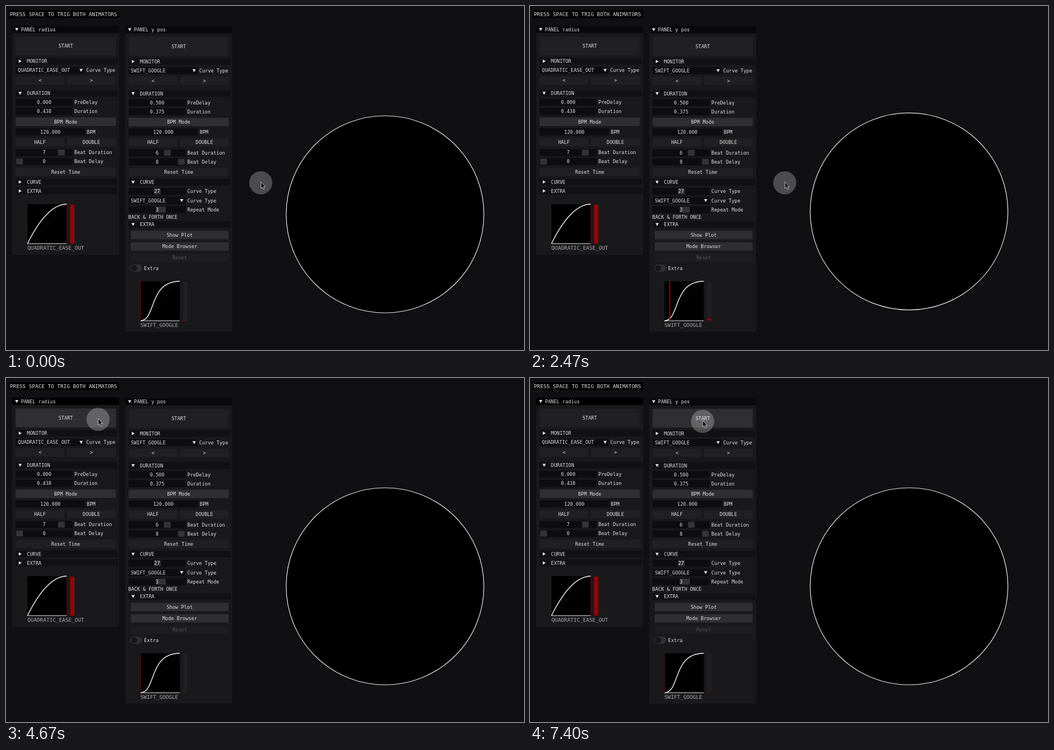
Recreate the animation shown at these times as an HTML page. Size 917 px wide and 611 px high, loop 8 s.

```html
<!DOCTYPE html>
<html lang="en">
<head>
<meta charset="utf-8">
<title>Animator panels</title>
<style>
  html, body { margin: 0; width: 100%; height: 100%; overflow: hidden; background: #100f12; }
  svg { display: block; width: 917px; height: 611px; }
  text { font: 8.53px "DejaVu Sans Mono", monospace; fill: #dedede; white-space: pre; }
  text.wide { font-size: 9.27px; }
</style>
</head>
<body>
<svg id="stage" viewBox="0 0 917 611"></svg>
<script>
const LOOP = 8000;
const stage = document.getElementById('stage');
const hotspots = [];
const BUTTON = '#202022', HOVER = '#2f2f31', FIELD = '#0d0d0f', HEADER = '#111113';

function add(tag, attrs, content) {
  const node = document.createElementNS('http://www.w3.org/2000/svg', tag);
  set(node, attrs);
  if (content) node.textContent = content;
  return stage.appendChild(node);
}

function set(node, attrs) {
  for (const key in attrs) node.setAttribute(key, attrs[key]);
}

function box(x, y, width, height, fill, hover, rx = 1) {
  const node = add('rect', { x, y, width, height, fill, rx });
  if (hover) hotspots.push({ node, x, y, width, height, fill, hover });
  return node;
}

function label(x, mid, content, attrs = {}) {
  return add('text', { x, y: mid + 3, ...attrs }, content);
}

function centred(x, mid, content, attrs) {
  return label(x, mid, content, { 'text-anchor': 'middle', ...attrs });
}

function arrow(x, y, open) {
  const points = open
    ? [x - 3, y - 2.6, x + 3, y - 2.6, x, y + 2.8]
    : [x - 2.4, y - 3, x + 2.8, y, x - 2.4, y + 3];
  add('polygon', { points: points.join(' '), fill: '#e4e4e4' });
}

function button(x, mid, width, height, content, fill = BUTTON, hover = HOVER, color = '#dedede') {
  box(x, mid - height / 2, width, height, fill, hover);
  centred(x + width / 2, mid, content, { style: `fill:${color}` });
}

function header(x, mid, content, open) {
  box(x + 17, mid - 6, 181, 12, HEADER, '#000');
  arrow(x + 25, mid, open);
  label(x + 37, mid, content);
}

function field(x, mid, width, value, name, grabX, grabWidth = 12) {
  box(x + 17, mid - 6.2, width, 12.4, FIELD);
  if (grabX) box(x + grabX, mid - 5.2, grabWidth, 10.4, '#343437');
  centred(x + 17 + width / 2, mid, value);
  label(x + 20 + width, mid, name);
}

function combo(x, mid, width, value, arrowX, name) {
  box(x + 17, mid - 6.2, width, 12.4, FIELD);
  label(x + 21, mid, value);
  arrow(x + arrowX, mid, true);
  label(x + 20 + width, mid, name);
}

// Curve plot with a progress line and a value bar
function plot(x, y, name, curve) {
  const size = 69.5;
  box(x, y, size, 70, '#000', null, 0);
  add('path', { d: `M${x} ${y + 70}l${size} -70`, stroke: '#161617', fill: 'none' });
  add('path', { d: `M${x} ${y + 70}h${size}`, stroke: '#e8e8e8', fill: 'none', 'stroke-width': 1.2 });
  add('path', {
    d: `M${x} ${y + 70}c${curve.map((v, i) => v * (i % 2 ? -70 : size)).join(' ')}`,
    stroke: '#f4f4f4', fill: 'none', 'stroke-width': 1.4
  });
  box(x + 75.5, y, 7.5, 70, '#202022', null, 0);
  const bar = box(x + 75.5, y, 7.5, 70, '#960003', null, 0);
  const line = add('path', { fill: 'none' });
  label(x, y + 78, name, { class: 'wide', style: 'fill:#a9a9a9' });
  return (progress, value) => {
    const running = progress > 0 && progress < 1;
    const height = Math.max(0.7, value * 69);
    set(bar, { y: y + 70 - height, height });
    set(line, {
      d: `M${x + 0.4 + progress * size} ${y}v70`,
      stroke: running ? '#9c0003' : '#650204',
      'stroke-width': running ? 1.8 : 1
    });
  };
}

function panel(x, y, height, title, values) {
  box(x + 11, 35 + y, 189.5, height, '#19191b', null, 2);
  const bar = box(x + 11, 35 + y, 189.5, 13, '#09090b', null, 2);
  arrow(x + 19, 41.5 + y, true);
  label(x + 26.5, 41.5 + y, title);
  button(x + 17, 71 + y, 177.5, 33.5, 'START');
  header(x, 98 + y, 'MONITOR', false);
  combo(x, 114.3 + y, 122, values.curve, 133, 'Curve Type');
  button(x + 17, 132.3 + y, 86.5, 15, '<');
  button(x + 108, 132.3 + y, 86.5, 15, '>');
  header(x, 155 + y, 'DURATION', true);
  field(x, 171 + y, 101, values.delay, 'PreDelay');
  field(x, 187.3 + y, 101, values.duration, 'Duration');
  button(x + 17, 205.5 + y, 177.5, 15, 'BPM Mode', HOVER, '#38383a');
  field(x, 223.5 + y, 123, '120.000', 'BPM');
  button(x + 17, 241.7 + y, 86.5, 15, 'HALF');
  button(x + 108, 241.7 + y, 86.5, 15, 'DOUBLE');
  field(x, 260.2 + y, 101, values.beats[0], 'Beat Duration', values.grabs[0]);
  field(x, 276.3 + y, 101, values.beats[1], 'Beat Delay', values.grabs[1]);
  button(x + 17, 294.5 + y, 177.5, 15, 'Reset Time');
  header(x, 312.5 + y, 'CURVE', values.open);
  return bar;
}

box(5, 7.5, 195, 14, '#000', null, 0);
label(7, 14.6, 'PRESS SPACE TO TRIG BOTH ANIMATORS', { class: 'wide' });

const radiusTitle = panel(0, 0, 407, 'PANEL radius', {
  curve: 'QUADRATIC_EASE_OUT', delay: '0.000', duration: '0.438',
  beats: ['7', '0'], grabs: [92, 18], open: false
});
header(0, 328.5, 'EXTRA', false);
const drawRadiusPlot = plot(38, 352, 'QUADRATIC_EASE_OUT', [1 / 3, 2 / 3, 2 / 3, 1, 1, 1]);

panel(200, 0.5, 543, 'PANEL y pos', {
  curve: 'SWIFT_GOOGLE', delay: '0.500', duration: '0.375',
  beats: ['6', '8'], grabs: [79.5, 104.5], open: true
});
field(200, 329.3, 101, '27', 'Curve Type', 62);
combo(200, 345.5, 101, 'SWIFT_GOOGLE', 111, 'Curve Type');
field(200, 361.7, 101, '3', 'Repeat Mode', 65, 18);
label(216.5, 374.8, 'BACK & FORTH ONCE');
header(200, 388, 'EXTRA', true);
button(221, 406.8, 173, 15, 'Show Plot', HOVER, '#38383a');
button(221, 427, 173, 15, 'Mode Browser', HOVER, '#38383a');
button(221, 447.2, 173, 15, 'Reset', '#1d1d1f', null, '#555557');
box(220, 459, 21, 13, '#303033', null, 6.5);
add('circle', { cx: 226.8, cy: 465.5, r: 5.3, fill: '#171719' });
label(244.5, 465.5, 'Extra');
const drawHeightPlot = plot(238, 489, 'SWIFT_GOOGLE', [0.4, 0, 0.2, 1, 1, 1]);

const ball = add('circle', { cx: 671, fill: '#000', stroke: '#e6e6e6', 'stroke-width': 1.2 });
const pointer = add('g', {});
pointer.append(
  add('circle', { r: 20.5, fill: '#fff', 'fill-opacity': 0.25 }),
  add('path', {
    d: 'M.3-1.5v11.5l2.5-2.3 2 4.3 1.9-.9-2-4.1h3.5z',
    fill: '#0b0b0c', stroke: '#d8d8d8', 'stroke-width': 0.8
  })
);

const clamp = v => Math.min(1, Math.max(0, v));
const easeOut = p => 1 - (1 - p) ** 2;

// cubic-bezier(.4, 0, .2, 1)
function swift(p) {
  let low = 0, high = 1, s = p;
  for (let i = 0; i < 22; i++) {
    s = (low + high) / 2;
    const x = 1.2 * (1 - s) ** 2 * s + 0.6 * (1 - s) * s * s + s ** 3;
    if (x < p) low = s; else high = s;
  }
  return 3 * (1 - s) * s * s + s ** 3;
}

const bothTriggers = [42, 1922];
const radiusTriggers = [...bothTriggers, 4760, 6194];
const mouseKeys = [
  [0, 451, 314], [3400, 451, 314], [3570, 561, 539], [3740, 250, 170],
  [3800, 215.5, 130], [3900, 140, 84], [3980, 113, 76], [4200, 162, 74],
  [4330, 163, 73.5], [5970, 163, 73.5], [6190, 165, 74.5], [6800, 165, 74.5],
  [7050, 235, 91], [7400, 305.5, 77], [LOOP, 305.5, 77]
];

function mouseAt(t) {
  const i = Math.max(1, mouseKeys.findIndex(key => key[0] >= t));
  const [t0, x0, y0] = mouseKeys[i - 1], [t1, x1, y1] = mouseKeys[i];
  const p = clamp((t - t0) / (t1 - t0));
  return [x0 + (x1 - x0) * p, y0 + (y1 - y0) * p];
}

function since(triggers, t) {
  const start = triggers.filter(time => time <= t).pop();
  return start === undefined ? Infinity : t - start;
}

function render(t) {
  const grow = clamp(since(radiusTriggers, t) / 438);
  const swing = (since(bothTriggers, t) - 500) / 375;
  const lift = clamp(swing < 1 ? swing : 2 - swing);
  const radius = easeOut(grow), height = swift(lift);
  drawRadiusPlot(grow, radius);
  drawHeightPlot(lift, height);
  set(ball, { r: 27 + 148 * radius, cy: 370 - 106 * height });

  const [x, y] = mouseAt(t);
  set(pointer, { transform: `translate(${x} ${y})` });
  // Hover highlights trail the pointer slightly
  const [hx, hy] = mouseAt(Math.max(0, t - 40));
  for (const spot of hotspots) {
    const over = hx >= spot.x && hx <= spot.x + spot.width && hy >= spot.y && hy <= spot.y + spot.height;
    set(spot.node, { fill: over ? spot.hover : spot.fill });
  }
  set(radiusTitle, { fill: t >= 4560 ? '#000' : '#09090b' });
}

const origin = performance.now();
function tick() {
  render((performance.now() - origin) % LOOP);
  requestAnimationFrame(tick);
}
tick();
</script>
</body>
</html>
```
